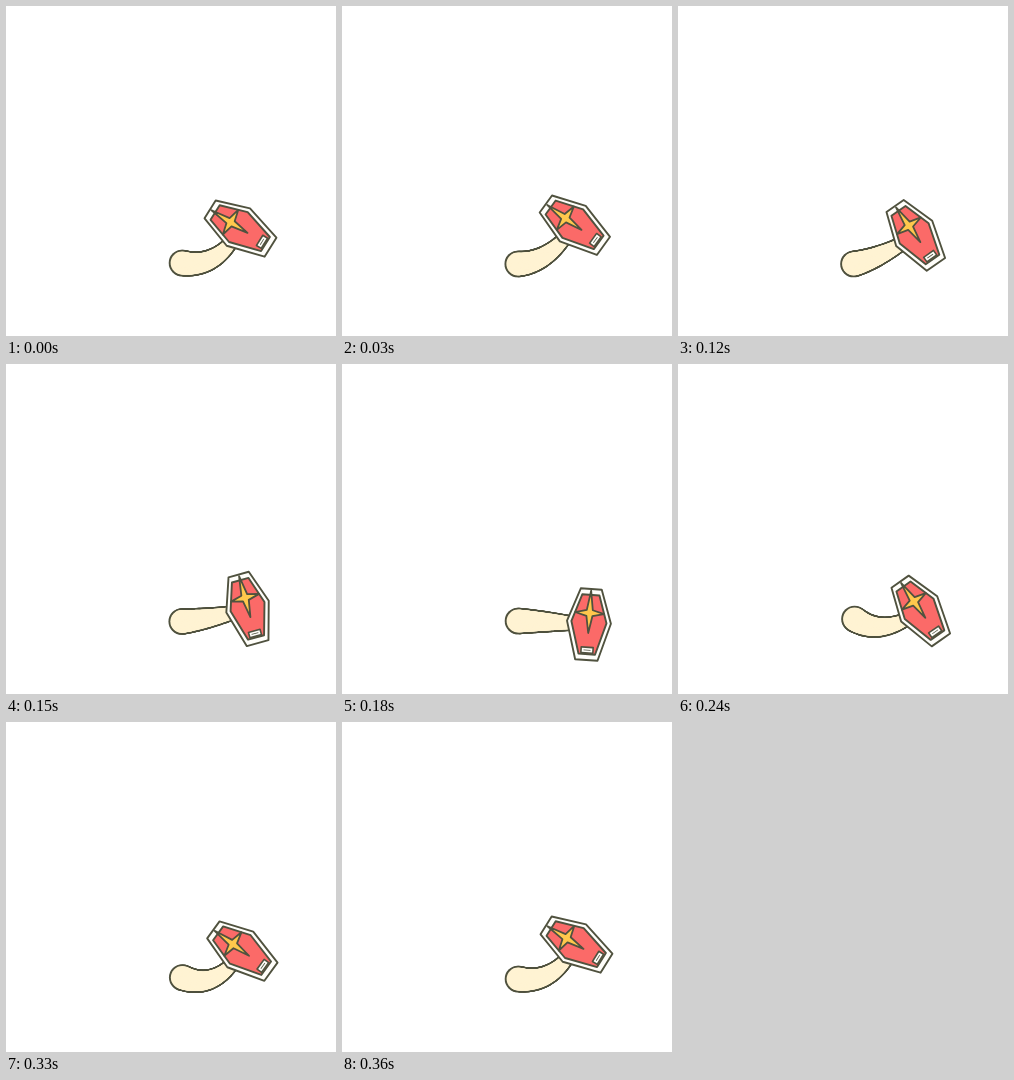
Animation of 330x330 px, one loop 480 ms. Source, as an HTML page with a canvas:

```html
<!DOCTYPE html>
<html lang="en">
<head>
<meta charset="utf-8">
<title>Hammer</title>
<style>
  html, body { margin: 0; width: 100%; height: 100%; overflow: hidden; background: #fff; }
  canvas { display: block; }
</style>
</head>
<body>
<canvas id="stage" width="330" height="330"></canvas>
<script>
const ctx = document.getElementById('stage').getContext('2d');
const LOOP = 480, STEP = 30, SWING_END = 360;
const INK = '#50523f', CREAM = '#fff3d3', RED = '#fb6a68', YELLOW = '#ffc84c', WHITE = '#fffefa';

// time, head x, head y, head angle, grip x, grip y, bend x, bend y
const poses = [
  [0,   234.3, 222.3, -58, 176,   257, 212, 263],
  [90,  231,   215.6, -50, 175.5, 259, 203, 251],
  [120, 237.5, 229.2, -35, 175.5, 258, 203, 252],
  [180, 246.8, 260.5,   4, 176,   257, 210, 257.5],
  [240, 242.5, 246.8, -35, 176.5, 255, 204, 274],
  [300, 238,   235.3, -50, 176.5, 254, 208, 276],
  [360, 234.3, 222.3, -58, 176,   257, 212, 263]
];

function poseAt(time) {
  const next = Math.max(1, poses.findIndex(p => p[0] >= time));
  const a = poses[next - 1], b = poses[next];
  let k = (time - a[0]) / (b[0] - a[0]);
  if (next === 1) k = Math.sin(k * Math.PI / 2);
  return a.map((v, i) => v + (b[i] - v) * k);
}

function shape(points, fill, lineWidth) {
  ctx.beginPath();
  points.forEach(([x, y]) => ctx.lineTo(x, y));
  ctx.closePath();
  ctx.fillStyle = fill;
  ctx.fill();
  ctx.lineWidth = lineWidth;
  ctx.stroke();
}

function hexagon(top, side, bottom, height) {
  return [[-top, -height], [top, -height], [side, -2.3],
          [bottom, height], [-bottom, height], [-side, -2.3]];
}

// Tapered round brush along a quadratic curve
function handle(x0, y0, x1, y1, x2, y2) {
  for (const [color, inset] of [[INK, 0], [CREAM, 1.9]]) {
    ctx.fillStyle = color;
    for (let t = 0; t <= 1; t += 0.01) {
      const u = 1 - t;
      const x = u * u * x0 + 2 * u * t * x1 + t * t * x2;
      const y = u * u * y0 + 2 * u * t * y1 + t * t * y2;
      ctx.beginPath();
      ctx.arc(x, y, 13.3 - 5.5 * t - 2.3 * t * t - inset, 0, 2 * Math.PI);
      ctx.fill();
    }
  }
}

function head(x, y, degrees) {
  ctx.save();
  ctx.translate(x, y);
  ctx.rotate(degrees * Math.PI / 180);
  ctx.strokeStyle = INK;
  ctx.lineJoin = 'round';
  shape(hexagon(10.5, 22, 11.2, 35.6), WHITE, 1.9);
  shape(hexagon(8.6, 17.6, 8.3, 29.7), RED, 1.9);
  shape([[0, -34], [3, -14.5], [14.5, -11.5], [3, -8.5],
         [0, 8.5], [-3, -8.5], [-14.5, -11.5], [-3, -14.5]], YELLOW, 1.8);
  shape([[-6, 22.8], [6, 22.8], [6, 28.4], [-6, 28.4]], WHITE, 1.6);
  ctx.fillStyle = INK;
  ctx.fillRect(-3.5, 25.2, 7, 0.8);
  ctx.restore();
}

function draw(now) {
  const step = Math.floor(now % LOOP / STEP) * STEP;
  const [, x, y, angle, gripX, gripY, bendX, bendY] = poseAt(Math.min(step, SWING_END));
  ctx.clearRect(0, 0, 330, 330);
  handle(gripX, gripY, bendX, bendY, x, y);
  head(x, y, angle);
}

const start = performance.now();
function tick() {
  draw(performance.now() - start);
  requestAnimationFrame(tick);
}
tick();
</script>
</body>
</html>
```
